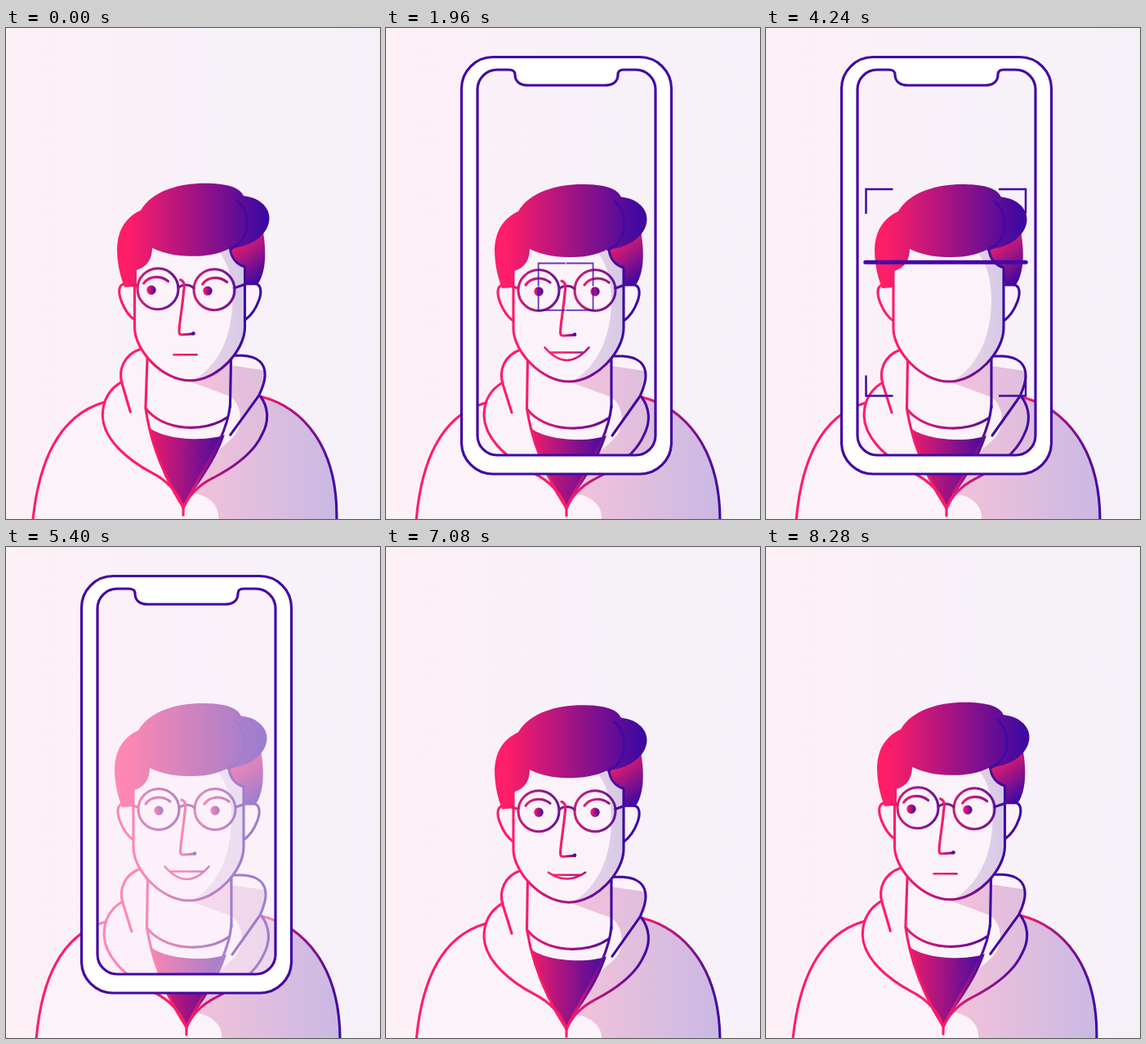
These frames come from a looping animation (458x600 px, 8320 ms). An HTML page:

```html
<!DOCTYPE html>
<html lang="en">
<head>
<meta charset="utf-8">
<title>Face scan</title>
<style>
html, body { margin: 0; width: 100%; height: 100%; overflow: hidden; background: #f8f1f9; }
svg { display: block; width: 458px; height: 600px; }
.line { fill: none; stroke-width: 3.1; stroke-linecap: round; stroke-linejoin: round; }
</style>
</head>
<body>
<svg viewBox="0 0 458 600" xmlns="http://www.w3.org/2000/svg">
<defs>
  <linearGradient id="bg"><stop stop-color="#fdf0f6"/><stop offset=".5" stop-color="#f8f1f9"/><stop offset="1" stop-color="#f6f1f8"/></linearGradient>
  <linearGradient id="hairFill" gradientUnits="userSpaceOnUse" x1="146" x2="312" y1="0" y2="0"><stop stop-color="#ff1e68"/><stop offset="1" stop-color="#3f09a1"/></linearGradient>
  <linearGradient id="backFill" gradientUnits="userSpaceOnUse" x1="284" y1="264" x2="314" y2="304"><stop stop-color="#e01c70"/><stop offset="1" stop-color="#3f09a1"/></linearGradient>
  <linearGradient id="shirtFill" gradientUnits="userSpaceOnUse" x1="178" x2="272" y1="0" y2="0"><stop stop-color="#ec1c6b"/><stop offset="1" stop-color="#400aa1"/></linearGradient>
  <linearGradient id="shade" gradientUnits="userSpaceOnUse" x1="225" x2="408" y1="0" y2="0"><stop stop-color="#f4c2d9"/><stop offset="1" stop-color="#cab9e4"/></linearGradient>
  <linearGradient id="faceShade" gradientUnits="userSpaceOnUse" x1="228" x2="292" y1="0" y2="0"><stop stop-color="#ecd3e5"/><stop offset="1" stop-color="#d6cae8"/></linearGradient>
  <linearGradient id="faceLine" gradientUnits="userSpaceOnUse" x1="165" x2="285" y1="0" y2="0"><stop stop-color="#ff1c68"/><stop offset="1" stop-color="#3f09a1"/></linearGradient>
  <linearGradient id="mouthLine" gradientUnits="userSpaceOnUse" x1="212" x2="278" y1="0" y2="0"><stop stop-color="#ff1c68"/><stop offset="1" stop-color="#5a109b"/></linearGradient>
  <linearGradient id="box"><stop stop-color="#ff1c68"/><stop offset="1" stop-color="#3f09a1"/></linearGradient>
  <linearGradient id="rim"><stop stop-color="#cb2072"/><stop offset="1" stop-color="#651596"/></linearGradient>
  <linearGradient id="brow"><stop stop-color="#e51d6d"/><stop offset="1" stop-color="#8b1988"/></linearGradient>
  <linearGradient id="noseLine"><stop offset=".3" stop-color="#f01d6a"/><stop offset="1" stop-color="#4a0c9e"/></linearGradient>
  <clipPath id="wipe"><rect id="wipeBox" width="458" height="600"/></clipPath>
</defs>
<rect width="458" height="600" fill="url(#bg)"/>

<g id="body">
  <path fill="#fcf2fa" d="M37 602C43 532 66 474 122 458C123 448 130 440 143 433C138 418 145 400 165 393L276 402L290 401C310 402 318 412 318 425C318 435 314 443 313 451C365 464 409 512 409 602Z"/>
  <path fill="url(#shade)" d="M224 432L276 451C291 462 293 486 281 500C273 509 264 514 259 522L232 569C252 572 266 584 264 602H409C409 512 365 464 313 451C314 440 318 435 317 419L276 413V402C262 425 240 431 224 432Z"/>
  <path fill="#fcf2fa" d="M173 465C195 493 245 495 275 474L270 499C245 508 195 505 176 488Z"/>
  <path fill="url(#shirtFill)" d="M176 488C195 504 245 507 270 498C258 535 236 560 221 586C202 560 184 520 176 488Z"/>
  <g class="line">
    <path stroke="#ff1c68" d="M37 602C43 532 66 474 122 458"/>
    <path stroke="url(#box)" d="M313 451C365 464 409 512 409 602"/>
    <path stroke="url(#faceLine)" d="M173 466C195 493 245 496 272 477"/>
    <path stroke="#f51c6a" d="M173.500 404L172.500 465C180 512 197 550 221 587"/>
    <path stroke="url(#box)" d="M276 462C272 505 240 545 221 587"/>
    <path stroke="#3f09a1" d="M276 402V464"/>
    <path stroke="#ff1c68" d="M165 393C145 400 138 418 143 435L154 470"/>
    <path stroke="#ff1c68" d="M143 433C126 443 120 458 120 474C121 505 155 530 181 544C201 554 214 568 221 587V596"/>
    <path stroke="#3f09a1" d="M276 401H290C310 402 318 412 318 425C318 435 314 443 311 450L277 498"/>
    <path stroke="url(#box)" d="M313 451C322 463 325 480 316 497C305 523 277 540 257 550.500C238 560 227 573 221 587"/>
  </g>
</g>

<g id="head">
  <g id="ears" class="line">
    <path fill="#fcf2fa" stroke="#ff1c68" d="M147 314C134 312 136 326 140 336C144 346 150 354 156 358"/>
    <path fill="#fcf2fa" stroke="#3f09a1" d="M291 314H303C312 314 311 326 308 334C304 345 298 353 291 358"/>
  </g>
  <path id="back" fill="url(#backFill)" d="M270 262L312 248C316 270 317 298 306 314H289V293L272 288Z"/>
  <g id="face">
    <path fill="#fcf2fa" d="M156 297L170 262H273C274 283 282 290 291 293V367C291 395 258 432 224 432C190 432 156 395 156 367Z"/>
    <path fill="url(#faceShade)" d="M255 270H273C274 283 282 290 291 293V367C291 395 258 432 228 432C262 411 275 375 276 335C276 305 270 285 255 270Z"/>
    <path class="line" stroke="url(#faceLine)" d="M156 296V367C156 395 190 432 224 432C258 432 291 395 291 367V293C281 290 274 282 273 270"/>
  </g>
  <g id="hair" fill="url(#hairFill)">
    <path d="M142 318C136 302 133 287 133 270C134 246 145 232 162 224C176 200 210 191 240 191C268 191 284 196 288 207L290 258L272 270C262 276 245 280 228 280C212 280 194 279 176 270C176 283 170 293 157 297V317Z"/>
    <path d="M283 206C307 207 319.500 220 319.500 234C319 255 294 270 272 270L262 240Z"/>
    <path class="line" stroke="#420aa2" d="M280 212C293 222 296 245 287 258C283 265 277 269 272 271"/>
  </g>
  <g clip-path="url(#wipe)">
    <g id="eyes">
      <g id="glasses" class="line">
        <circle cx="187" cy="320.500" r="25" stroke="url(#rim)"/>
        <circle cx="256" cy="320.500" r="25" stroke="url(#rim)"/>
        <path stroke="#7c178e" d="M212 319C217 314 226 314 231 319"/>
        <path stroke="#e21d6d" d="M155 316L162 318"/>
        <path stroke="#4a0c9e" d="M281 318L292 314"/>
      </g>
      <g id="brows" class="line">
        <path stroke="url(#brow)" d="M171 314C178 304 192 304 201 311"/>
        <path stroke="url(#brow)" d="M243 314C250 304 264 304 273 311"/>
      </g>
      <g id="pupils" fill="url(#box)">
        <circle cx="187" cy="322" r="5.700"/>
        <circle cx="256" cy="322" r="5.700"/>
      </g>
    </g>
    <g id="nose">
      <path class="line" stroke="url(#noseLine)" d="M215 309C221 311 220 317 219 324C217 346 214 359 213.500 372C213.500 376 215 376 218 376L231 375"/>
      <circle cx="231" cy="374.500" r="2.300" fill="#4a0c9e"/>
    </g>
    <g id="mouth" class="line" stroke="url(#mouthLine)">
      <path id="lips" style="stroke-width:2.600"/>
      <path id="teeth" style="stroke-width:2.400"/>
    </g>
  </g>
</g>

<g id="phone">
  <path id="screen" fill="#fdf2fb"/>
  <g id="done" class="line" stroke="url(#faceLine)" style="stroke-width:4">
    <circle id="ring" cx="221" cy="291.500" r="75" transform="rotate(-90 221 291.500)" pathLength="1"/>
    <path id="tick" d="M186 294L211 319L260 267" pathLength="1"/>
  </g>
  <path id="frame" fill="#fff" fill-rule="evenodd" stroke="#4309a3" stroke-width="3.200"/>
</g>
<path id="marks" fill="none" stroke="#4309a3"/>
<path id="beam" class="line" stroke="#4309a3" style="stroke-width:5" d="M121.800 0H318.200"/>
</svg>
<script>
const LOOP = 8320;
const el = {};
document.querySelectorAll('[id]').forEach(n => el[n.id] = n);
const set = (id, name, v) => el[id].setAttribute(name, v);
const move = (id, x, y) => set(id, 'transform', `translate(${x} ${y})`);
const mix = (a, b, k) => a + (b - a) * k;
const part = (t, a, b) => Math.min(1, Math.max(0, (t - a) / (b - a)));
const sine = k => (1 - Math.cos(Math.PI * k)) / 2;
const cubic = k => k < .5 ? 4 * k ** 3 : 1 - (2 - 2 * k) ** 3 / 2;
const out = k => 1 - (1 - k) ** 3;
const back = k => 1 + 2.7 * (k - 1) ** 3 + 1.7 * (k - 1) ** 2;

const screenPath = 'M136 51H150C156 51 158 53 158 57C158 66 165 70 174 70H268C277 70 284 66 284 57C284 53 286 51 291 51H306A24 24 0 0 1 330 75V498A24 24 0 0 1 306 522H136A24 24 0 0 1 112 498V75A24 24 0 0 1 136 51Z';
set('screen', 'd', screenPath);
set('frame', 'd', 'M131 35.500H311A38.500 38.500 0 0 1 349.500 74V506.500A38.500 38.500 0 0 1 311 545H131A38.500 38.500 0 0 1 92.500 506.500V74A38.500 38.500 0 0 1 131 35.500Z' + screenPath);

// -1 looks left, 0 ahead, 1 right
function drawPerson(t) {
  const p = -1 + 2 * cubic(part(t, 20, 760)) - cubic(part(t, 880, 1600)) - cubic(part(t, 7460, 8260));
  const off = (l, r) => p < 0 ? -p * l : p * r;
  const dip = 2.2 * sine(part(t, 6620, 7060)) * (1 - cubic(part(t, 7460, 8260)));
  const k = off(-3.7, 3.5) / 200;
  set('body', 'transform', `matrix(1 0 ${k} 1 ${-k * 380} ${off(-.8, 0) + dip})`);
  move('head', 0, off(-1.2, 0) + dip);
  set('eyes', 'transform', `rotate(${off(.8, 0)} 221 320)`);
  const shifts = {
    ears: [1.7, -1.5], back: [2.5, -2.5], face: [1.5, -1], hair: [3, -2.7],
    glasses: [-1, 2.5], brows: [-2.5, 6], pupils: [-9, 13], nose: [-1.5, 4], mouth: [-2, 3.5]
  };
  for (const id in shifts) move(id, off(...shifts[id]), 0);

  const s = sine(part(t, 1160, 1640)) * (1 - .5 * sine(part(t, 6680, 7080))) * (1 - sine(part(t, 7400, 7960)));
  const w = 14 + 13 * s ** .6, y = 400.5 - 10 * s, low = 400.5 + 5.5 * s;
  set('lips', 'd', `M${221.5 - w} ${y}Q221.500 ${2 * low - y} ${221.5 + w} ${y}`);
  set('teeth', 'd', `M${221.5 - w * .76} ${400.5 - 4 * s}H${221.5 + w * .76}`);
  set('teeth', 'opacity', part(s, .05, .3));
}

function drawPhone(t) {
  const y = t < 4000 ? 570 * (1 - cubic(part(t, 240, 1056))) : -570 * part(t, 6600, 7060) ** 2.4;
  move('phone', 0, y);
  set('screen', 'opacity', sine(part(t, 5000, 5800)));
  const ring = sine(part(t, 5560, 6180)), tick = sine(part(t, 5940, 6280));
  [['ring', ring], ['tick', tick]].forEach(([id, k]) => {
    set(id, 'stroke-dasharray', `${k} 2`);
    set(id, 'opacity', k > 0 ? 1 : 0);
  });
}

function drawMarks(t) {
  const grow = out(part(t, 1700, 1960)), k = part(t, 1960, 2500);
  const a = out(k), b = back(k);
  const ax = 33 * grow, ay = mix(28, 30, a) * grow;
  const l = mix(220 - ax, 122.500, a), r = mix(220 + ax, 318, b);
  const u = mix(316 - ay, 197, a), d = mix(316 + ay, 449.500, b);
  const up = mix(ay, 25, a);
  set('marks', 'd', `M${l + ax} ${u}H${l}V${u + ay}M${r - ax} ${u}H${r}V${u + ay}M${l + ax} ${d}H${l}V${d - up}M${r - ax} ${d}H${r}V${d - up}`);
  set('marks', 'stroke-width', mix(1.8, 2.5, a));
  set('marks', 'opacity', mix(.8, 1, a) * part(t, 1700, 1800) * (1 - part(t, 5020, 5240)));
}

function drawScan(t) {
  const down = t >= 3920;
  const y = down ? mix(238, 438.500, part(t, 3920, 4880) ** 1.3) : mix(446, 238, sine(part(t, 2520, 3560)));
  move('beam', 0, y);
  set('beam', 'opacity', part(t, 2520, 2600) * (1 - part(t, 4800, 4880)));
  const edge = t < 2520 || t > 4880 ? 600 : down ? y : y + 55 * (1 - part(t, 3360, 3560));
  set('wipeBox', 'height', edge);
}

function draw(now) {
  const t = now % LOOP;
  drawPerson(t);
  drawPhone(t);
  drawMarks(t);
  drawScan(t);
}

const start = performance.now();
function tickFrame() {
  draw(performance.now() - start);
  requestAnimationFrame(tickFrame);
}
tickFrame();
</script>
</body>
</html>
```
